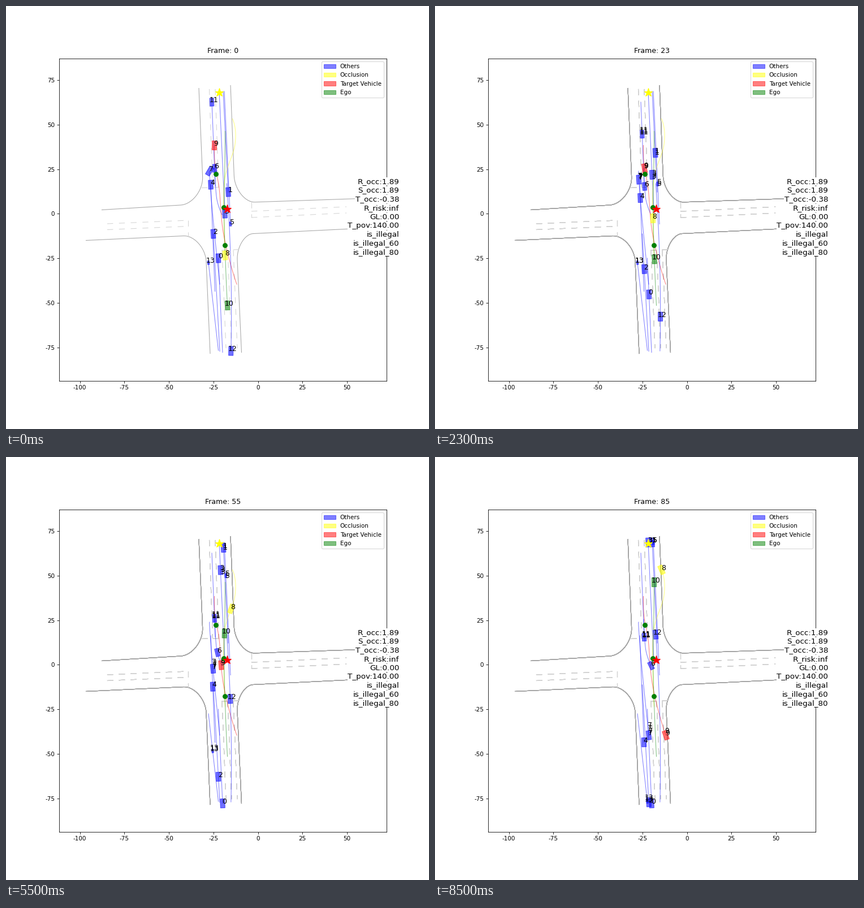
A matplotlib script for the animation above (8600 ms loop, 748 by 748 pixels).

```python
import numpy as np
import matplotlib.pyplot as plt
from matplotlib.animation import FuncAnimation
from matplotlib.collections import LineCollection
from matplotlib.patches import Patch, Polygon

FRAMES, STEP = 86, 100
LAST = FRAMES - 1
SCALE, ORIGIN = 3.15, (445.6, 367.3)   # stage pixels per metre, stage place of (0, 0)
LAYERS = 12                            # the map is painted again on every step

plt.rcParams["axes.unicode_minus"] = False
fig = plt.figure(figsize=(10, 10), dpi=74.8)
ax = fig.add_subplot()
ax.set_aspect("equal")
ax.set_xlim(-111.78, 72.25)
ax.set_ylim(-93.72, 87.1)
title = ax.set_title("Frame: 0", pad=10)


def world(points):
    p = np.asarray(points, float)
    return (p - ORIGIN) / (SCALE, -SCALE)


# --- map -------------------------------------------------------------
def border(a, b, c, d):
    """Straight a-b, a rounded corner, straight c-d."""
    a, b, c, d = map(np.array, (a, b, c, d))
    k, _ = np.linalg.solve(np.column_stack([b - a, c - d]), c - a)
    tip = a + k * (b - a)
    u = np.linspace(0, 1, 20)[:, None]
    v = 1 - u
    arc = (v**3 * b + 1.5 * v * v * u * (b + tip)
           + 1.5 * v * u * u * (c + tip) + u**3 * c)
    return world(np.vstack([a, arc, d]))


borders = [
    border((341, 145), (347.6, 302), (309, 352), (169, 360.5)),
    border((141, 414.5), (314, 406.5), (354, 452), (361, 615)),
    border((397, 140), (403.3, 300), (440, 346.8), (640, 340)),
    border((640, 392.5), (437, 402.5), (409, 449), (416.5, 613)),
]
lanes = [[(x, 147), (x + 6, 321)] for x in (359.5, 370)]
lanes += [[(x, 432), (x + 7, 605)] for x in (382, 392, 402)]
lanes += [[(179, y + 6), (321, y)] for y in (379, 389.5)]
lanes += [[(434, y), (602, y - 8)] for y in (363, 374)]
lanes += [[(346, 321.5), (377, 320.5)], [(381, 432), (413, 430.5)],
          [(321.5, 379), (321.5, 408)], [(434, 347), (434, 374)]]
lanes = [world(l) for l in lanes]


def paint_map():
    style = dict(linewidths=1, zorder=1)
    parts = [LineCollection(borders, colors="#a6a6a6", **style),
             LineCollection(lanes, colors="#d3d3d3", linestyles=[(0, (10, 10))], **style)]
    return [ax.add_collection(p, autolim=False) for p in parts]


layers = [paint_map() for _ in range(LAYERS)]

for x, y in world([(370.5, 297), (384.5, 355.5), (387, 423)]):
    ax.plot(x, y, "o", color="green", ms=7.5, zorder=4)
for spot, color in [((377, 153), "yellow"), ((391, 359), "red")]:
    ax.plot(*world(spot), "*", color=color, ms=15, zorder=4)


# --- vehicles --------------------------------------------------------
class Car:
    """Smooth drive past stops evenly spaced in time, at rest before and after."""

    def __init__(self, *stops, begin=0, end=LAST, color="blue", size=1):
        self.p = world(stops)
        self.t = np.linspace(begin, end, len(stops))
        self.h = self.t[1] - self.t[0]
        self.m = np.gradient(self.p, axis=0, edge_order=2)
        l, w = np.array([8, 4]) * size / SCALE
        self.shape = np.array([(-l, -w), (l, -w), (l, w), (-l, w)])
        path = self.at(np.linspace(begin, end, 120))
        ax.plot(*path.T, color=color, alpha=0.5, lw=1, zorder=2)
        self.patch = ax.add_patch(Polygon(self.shape, color=color, alpha=0.56,
                                          lw=1, zorder=2.2))

    def at(self, t):
        s = np.clip((np.atleast_1d(t) - self.t[0]) / self.h, 0, len(self.t) - 1)
        i = np.minimum(s.astype(int), len(self.t) - 2)
        u = (s - i)[:, None]
        v = 1 - u
        return (v * v * ((1 + 2 * u) * self.p[i] + u * self.m[i])
                + u * u * ((3 - 2 * u) * self.p[i + 1] - v * self.m[i + 1]))

    def move(self, t):
        mid = np.clip(t, self.t[0] + 0.5, self.t[-1] - 0.5)
        a, b = self.at([mid - 0.5, mid + 0.5])
        c, s = (b - a) / np.hypot(*(b - a))
        self.patch.set_xy(self.at(t) + self.shape @ np.array([(c, s), (-s, c)]))


def straight(start, stop, pickup=0, **kw):
    """One lane from start to stop; pickup > 0 speeds up, < 0 slows down."""
    a, b = np.array(start), np.array(stop)
    return Car(a, a + (0.5 - pickup / 4) * (b - a), b, **kw)


cars = [
    straight((375.5, 446), (383, 612.5), 0.17, end=54),
    straight((393, 329), (384, 151), 0.03, end=58),
    straight((366.5, 403), (378, 610.5), 0.17, end=68),
    straight((387, 367), (377, 151), 0.04, end=70.5),
    straight((362, 316), (369.5, 504.5), 0.74),
    straight((397, 385.5), (386, 151), 0.08, end=72, size=0.45),
    Car((369, 287), (371, 325), (374, 347), (382, 369), size=0.88),
    Car((360, 292), (361, 314.5), (366.5, 379.5), (378, 492)),
    Car((387.5, 441), (385.5, 381), (386.5, 307), (405, 244.5), (400.5, 199.5),
        color="yellow"),
    Car((368.5, 246.5), (370, 284), (377, 323), (384.8, 404), (408, 492),
        color="red"),
    Car((391.5, 529.5), (388.2, 454.5), (385.7, 368.5), (387, 276.5), (387.5, 221.5),
        color="green"),
    straight((364, 170), (370, 318.5), -0.56, size=0.88),
    Car((397.8, 610), (397.6, 462), (390.3, 314), begin=7),
    straight((358, 454), (375.5, 609), 0.3, begin=25, size=0.4),
]

# Only every second label is cleared on each step, so some linger for a while.
SLOTS = 17
labels, live = [], []
for k in range(FRAMES):
    live = live[1::2] + [(k, i) for i in range(SLOTS)]
    labels.append([(t, i) for t, i in live if i < len(cars)])
pool = [ax.text(0, 0, "", fontsize=12, ha="center", va="center")
        for _ in range(max(map(len, labels)))]

# --- captions --------------------------------------------------------
info = ["R_occ:1.89", "S_occ:1.89", "T_occ:-0.38", "R_risk:inf", "GL:0.00",
        "T_pov:140.00", "is_illegal", "is_illegal_60", "is_illegal_80"]
x, y = world((695.3, 313.6))
for n, line in enumerate(info):
    ax.text(x, y - 5 * n, line, fontsize=13, ha="right", va="baseline",
            bbox=dict(facecolor="white", edgecolor="none", pad=0.8))

names = [("blue", "Others"), ("yellow", "Occlusion"),
         ("red", "Target Vehicle"), ("green", "Ego")]
ax.legend(handles=[Patch(color=c, alpha=0.5, label=s) for c, s in names],
          loc="upper right")


def update(k):
    title.set_text(f"Frame: {k}")
    for n, layer in enumerate(layers):
        for part in layer:
            part.set_visible(n <= k)
    for car in cars:
        car.move(k)
    for text in pool:
        text.set_visible(False)
    for text, (t, i) in zip(pool, labels[k]):
        text.set_text(str(i))
        text.set_position(cars[i].at(t)[0] + 1)
        text.set_visible(True)
    return []


anim = FuncAnimation(fig, update, frames=FRAMES, interval=STEP,
                     init_func=lambda: update(0), repeat=True, repeat_delay=0)
plt.show()
```
